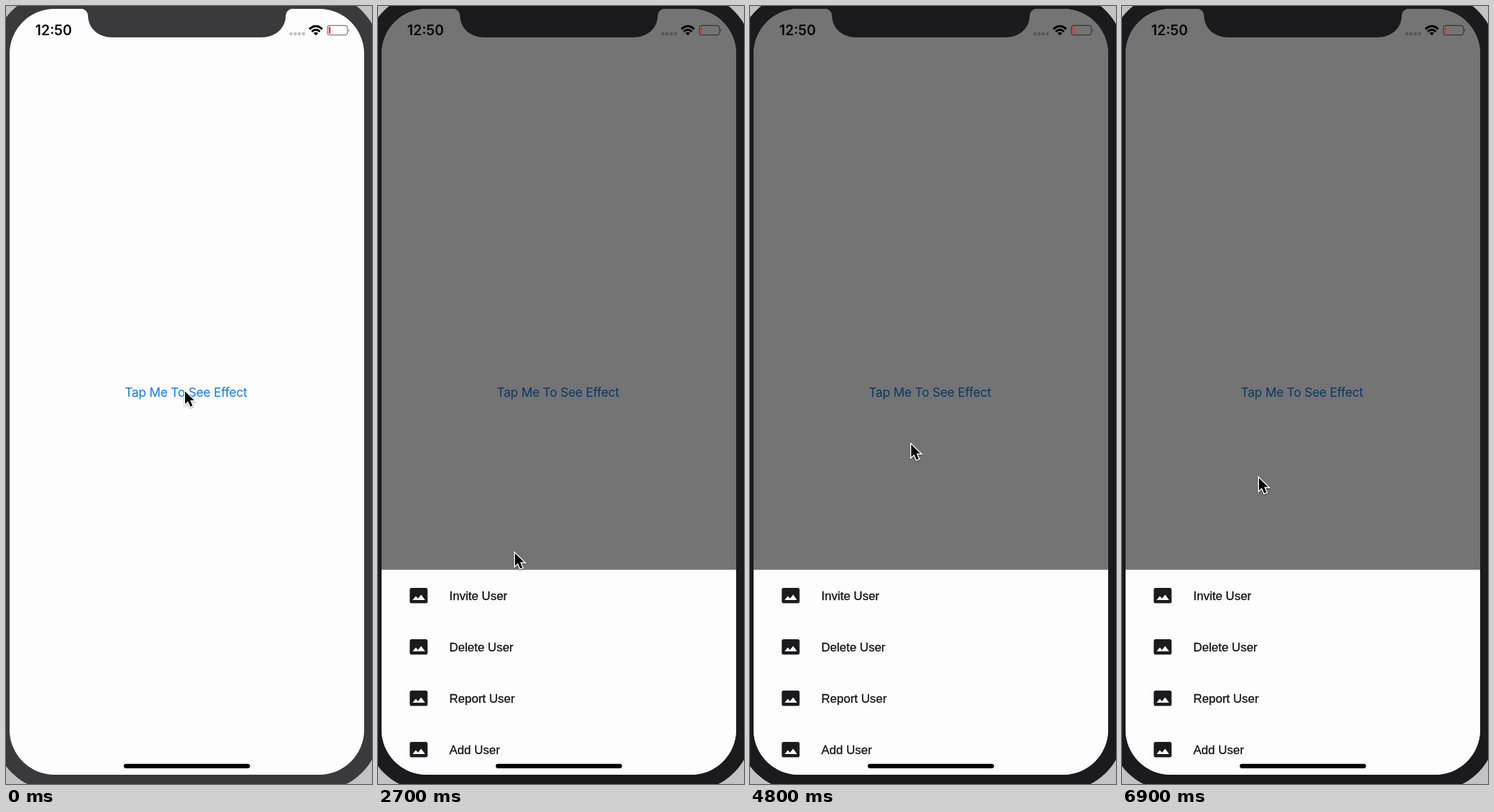
Write an HTML page that moves like this. It is 513 px wide and 1091 px high and loops after 7 s.

```html
<!DOCTYPE html>
<html lang="en">
<head>
<meta charset="utf-8">
<title>Bottom sheet</title>
<style>
  html, body { margin: 0; width: 100%; height: 100%; overflow: hidden; background: #c2c1c3; }
  svg { display: block; width: 100%; height: 100%; }
  .time { font: 600 19.5px Inter, Roboto, sans-serif; fill: #050506; }
  .button { font: 17.4px Inter, Roboto, sans-serif; letter-spacing: -.2px; fill: #0f78e6; }
  .row { font: 17px "Liberation Sans", Arial, sans-serif; stroke: #000; stroke-width: .3px; }
  .paper { fill: #fefdfe; }
  .line { fill: none; stroke: #000; }
  #cursor { filter: drop-shadow(0 1px 1px rgba(0, 0, 0, .4)); }
</style>
</head>
<body>
<svg viewBox="0 0 513 1091">
  <defs>
    <clipPath id="screen"><rect x="5" y="4" width="497" height="1074" rx="63"/></clipPath>
    <g id="picture">
      <rect x="44.5" y="-11" width="25" height="21.5" rx="2.5"/>
      <path class="paper" d="M48.5 6L53 .5L56 4L60.500 -1.500L66 6Z"/>
    </g>
  </defs>

  <g id="body">
    <rect x="-17" y="-18" width="541" height="1118" rx="85"/>
    <g clip-path="url(#screen)">
      <rect class="paper" width="513" height="1091"/>
      <text class="button" x="166.500" y="548">Tap Me To See Effect</text>
      <rect id="dim" width="513" height="1091" fill="#010001"/>
      <g id="sheet"><rect class="paper" width="513" height="300"/></g>
    </g>
    <path d="M103 3C111 4 115 8 115 15C116 32 130 44 149 44H358C377 44 391 32 392 15C392 8 396 4 404 3Z"/>
  </g>

  <g fill="#000">
    <text class="time" x="41" y="41">12:50</text>
    <path class="line" d="M399.500 39H418" stroke-width="4.800" stroke-linecap="round" stroke-dasharray="0 5.800" stroke-opacity=".23"/>
    <path class="line" d="M425.300 32.300Q434.300 24.300 443.300 32.300M428.600 35.800Q434.300 30.800 440 35.800" stroke-width="2.900"/>
    <path d="M434.300 41.300L431 38Q434.300 35.300 437.600 38Z"/>
    <rect class="line" x="450.500" y="27.300" width="28" height="13.400" rx="3.500" stroke-width="1.200" stroke-opacity=".5"/>
    <path d="M480 31.500Q482.300 34 480 36.500Z" fill-opacity=".5"/>
    <rect x="452.300" y="29.300" width="2.500" height="9.400" rx="1" fill="#e8352b"/>
    <rect x="165" y="1062.700" width="177" height="6.200" rx="3.100"/>
    <path id="cursor" d="M1.500 3.500V21L5.500 17.200L8.900 24.800L12 23.500L8.700 16H14.300Z"
          stroke="#fff" stroke-width="2.800" paint-order="stroke"/>
  </g>
</svg>
<script>
const $ = id => document.getElementById(id);
const LOOP = 7000, STEP = 100;
const ROW = 72, OPEN_Y = 790.6, DIM = .54;
const labels = ["Invite User", "Delete User", "Report User", "Add User"];

labels.forEach((label, i) => {
  $("sheet").insertAdjacentHTML("beforeend",
    `<g transform="translate(0 ${ROW * (i + .5) + .4})"><use href="#picture"/><text class="row" x="100" y="6">${label}</text></g>`);
});

// The sheet opens and closes in turn.
const toggles = [355, 2760, 3690, 5350, 6180];

// The pointer rests between glides: start, end, place reached.
const home = [249.5, 537];
const glides = [
  [1400, 2110, [190, 811]],
  [2400, 2500, [190.5, 764]],
  [2950, 3400, home],
  [4400, 4800, [224.5, 611.5]],
  [5500, 6050, [260.5, 535.5]],
  [6780, 6900, [190.5, 658.5]],
];

// cubic-bezier(.4, 0, .2, 1)
function ease(x) {
  if (x <= 0) return 0;
  if (x >= 1) return 1;
  let lo = 0, hi = 1, s;
  for (let i = 0; i < 20; i++) {
    s = (lo + hi) / 2;
    if (1.2 * s * (1 - s) ** 2 + .6 * s * s * (1 - s) + s ** 3 < x) lo = s; else hi = s;
  }
  return s * s * (3 - 2 * s);
}

// How far sheet and dimming have come in; the dimming settles later.
function sheetAt(t) {
  const i = toggles.findLastIndex(start => start <= t);
  if (i < 0) return [0, 0];
  const since = t - toggles[i];
  return i % 2
    ? [1 - ease(since / 250), 1 - ease(since / 250)]
    : [ease(since / 300), ease(since / 480)];
}

function pointerAt(t) {
  return glides.reduce((from, [start, end, to]) => {
    const p = ease((t - start) / (end - start));
    return from.map((v, i) => v + (to[i] - v) * p);
  }, home);
}

function draw(now) {
  const t = Math.floor(now % LOOP / STEP) * STEP;
  const [sheet, dim] = sheetAt(t);
  $("body").setAttribute("fill", t < 300 ? "#3a393b" : "#1b1a1d");
  $("sheet").setAttribute("transform", `translate(0 ${OPEN_Y + ROW * labels.length * (1 - sheet)})`);
  $("dim").setAttribute("opacity", DIM * dim);
  $("cursor").setAttribute("transform", `translate(${pointerAt(t)})`);
}

const start = performance.now();
function tick() {
  draw(performance.now() - start);
  requestAnimationFrame(tick);
}
tick();
</script>
</body>
</html>
```
